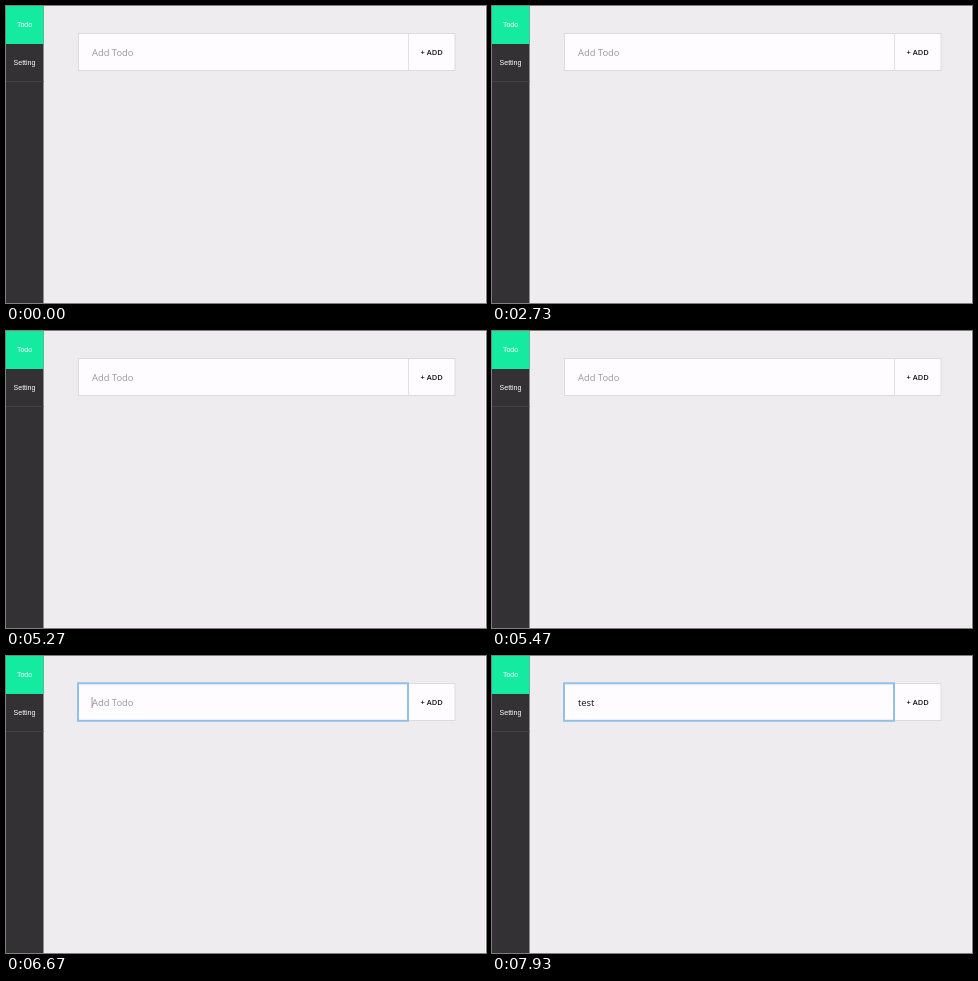
An HTML page with a canvas for the animation above (8 s loop, 480 by 297 pixels).

```html
<!DOCTYPE html>
<html lang="en">
<head>
<meta charset="utf-8">
<title>Todo app</title>
<style>
  html, body { margin: 0; width: 100%; height: 100%; overflow: hidden; background: #eeecee; }
  canvas { display: block; width: 480px; height: 297px; }
</style>
</head>
<body>
<canvas id="stage" width="480" height="297"></canvas>
<script>
const LOOP = 8000;
const SETTING_IN = 3870, SETTING_OUT = 5200, FOCUS = 6000;
const KEYS = [[7000, "t"], [7070, "e"], [7270, "s"], [7330, "t"]];
const SANS = '"Liberation Sans", Arial, sans-serif';
const HUMANIST = '"Open Sans", "Noto Sans", sans-serif';
const INPUT_FONT = `9.4px ${HUMANIST}`;

const canvas = document.getElementById("stage");
const ctx = canvas.getContext("2d");
const clamp = v => Math.max(0, Math.min(1, v));

function rect(x, y, w, h, color) {
  ctx.fillStyle = color;
  ctx.fillRect(x, y, w, h);
}

function label(text, x, y, font, color, align = "left") {
  ctx.font = font;
  ctx.textAlign = align;
  ctx.fillStyle = color;
  ctx.fillText(text, x, y);
}

function drawSidebar() {
  rect(0, 0, 37.5, 297, "#333133");
  rect(0, 0, 37.5, 38, "#14eba0");
  rect(0, 75, 37.5, 1, "#434143");
  label("Todo", 18.5, 21.3, `7px ${SANS}`, "#fff", "center");
  label("Setting", 18.5, 59, `7px ${SANS}`, "#fff", "center");
}

// The caret holds after each keystroke, then fades out and back in.
function caretAlpha(sinceReset) {
  const t = sinceReset % 1000;
  return t < 530 ? 1 - clamp((t - 200) / 330) : clamp((t - 530) / 270);
}

function drawTodo(t) {
  rect(72, 27, 377.5, 38, "#dddbdd");
  rect(73, 28, 375.5, 36, "#fefcfe");
  rect(402, 28, 1, 36, "#e2e0e2");
  label("+ ADD", 425.6, 49, `600 7.5px ${HUMANIST}`, "#111", "center");

  const focused = t >= FOCUS;
  const typed = KEYS.filter(([at]) => t >= at);
  const value = typed.map(([, key]) => key).join("");

  if (focused) {
    ctx.strokeStyle = "#93c0e8";
    ctx.lineWidth = 2;
    ctx.strokeRect(72, 27.3, 330, 37.5);
  }
  label(value || "Add Todo", 86, 50, INPUT_FONT, value ? "#111" : "#9b999b");
  if (focused) {
    const reset = typed.length ? typed[typed.length - 1][0] + 70 : FOCUS;
    ctx.globalAlpha = caretAlpha(Math.max(0, t - reset));
    rect(85.6 + (value ? ctx.measureText(value).width : 0), 41, 0.9, 11, "#333");
    ctx.globalAlpha = 1;
  }
}

function draw(now) {
  const t = now % LOOP;
  rect(0, 0, 480, 297, "#eeecee");
  rect(479, 0, 1, 297, "#f7f6f7");
  drawSidebar();
  if (t >= SETTING_IN && t < SETTING_OUT) {
    label("Setting Page", 72, 33.7, `7.5px ${SANS}`, "#111");
  } else {
    drawTodo(t);
  }
}

const start = performance.now();
function frame() {
  draw(performance.now() - start);
  requestAnimationFrame(frame);
}
frame();
</script>
</body>
</html>
```
